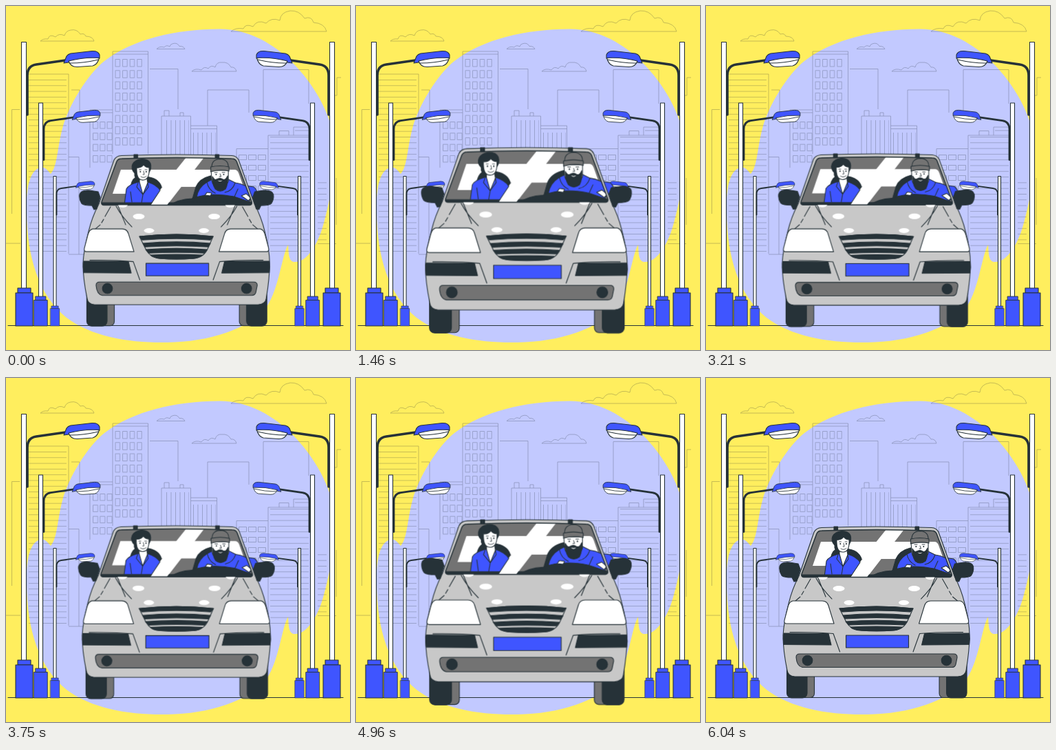
These frames come from a looping animation (500 by 500 pixels, 6080 ms). An HTML page:

```html
<!DOCTYPE html>
<html lang="en">
<head>
<meta charset="utf-8">
<title>Car ride</title>
<style>
  html, body { margin: 0; width: 100%; height: 100%; overflow: hidden; background: #ffee5e; }
  svg { display: block; width: 100vw; height: 100vh; }
  .city { fill: none; stroke: #263238; stroke-width: .7; opacity: .38; }
  .ink { stroke: #263238; stroke-width: 1.1; stroke-linejoin: round; stroke-linecap: round; }
  .ink * { vector-effect: non-scaling-stroke; }
  .dark { fill: #263238; }
  .blue { fill: #3f55ff; }
  .white { fill: #fff; }
  .grey { fill: #737373; }
  .body { fill: #c8c8c8; }
  .line { fill: none; }
  .bare { stroke: none; }
  .car { transform-origin: 247.5px 340.5px; animation: ride 6080ms linear infinite; }
  @keyframes ride {
    0% { transform: scale(1.001); }
    4.9% { transform: scale(1.022); }
    10.4% { transform: scale(1.054); }
    17.2% { transform: scale(1.1); }
    51.5% { transform: scale(1.0125); }
    57% { transform: scale(1.001); }
    61.5% { transform: scale(1.009); }
    69.9% { transform: scale(1.054); }
    77.4% { transform: scale(1.1); }
    99.4%, 100% { transform: scale(1); }
  }
</style>
</head>
<body>
<svg viewBox="0 0 500 500">
  <defs>
    <pattern id="tower" x="158.500" y="77" width="10.600" height="16.300" patternUnits="userSpaceOnUse">
      <path d="M.5 .5h6.500v10.500h-6.500z" fill="none" stroke="#263238" stroke-width=".7"/>
    </pattern>
    <pattern id="block" x="126" y="168" width="10.300" height="16.300" patternUnits="userSpaceOnUse">
      <path d="M.5 .5h7v9.500h-7z" fill="none" stroke="#263238" stroke-width=".7"/>
    </pattern>
    <pattern id="flat" x="338" y="216" width="14" height="15" patternUnits="userSpaceOnUse">
      <path d="M.5 .5h11v7h-11z" fill="none" stroke="#263238" stroke-width=".7"/>
    </pattern>
    <pattern id="floors" y="107" width="20" height="8.300" patternUnits="userSpaceOnUse">
      <path d="M0 .5h20" stroke="#263238" stroke-width=".7"/>
    </pattern>
    <pattern id="ribs" x="233" width="6.500" height="20" patternUnits="userSpaceOnUse">
      <path d="M.5 0v20" stroke="#263238" stroke-width=".7"/>
    </pattern>

    <!-- Arm and head; origin at the arm's x and the head's top -->
    <g id="arm">
      <path d="M0 93V36Q0 22 13 20L55 14" fill="none" style="vector-effect:none" stroke-width="3.600"/>
      <path class="blue" d="M53 18L57 8Q59 5 63 4L94 .5Q103 0 105 6V11L60 17Z"/>
      <path class="white" d="M60 15Q82 9 104.500 10.500Q102 20 95 22L73 23.500Q63 24 60 15Z"/>
      <path class="line" d="M62 18Q83 18 103 13"/>
    </g>
    <!-- Foot; origin at the arm's x and the ground -->
    <g id="foot" class="blue">
      <path d="M-14-55H5V-48H-14Z"/>
      <path d="M-17-48H8V0H-17Z"/>
    </g>
    <g id="lamps1">
      <path class="white" d="M22.500 52.500h7V411h-7z"/>
      <use href="#arm" transform="translate(31 65)"/>
      <use href="#foot" transform="translate(31 465)"/>
    </g>
    <g id="lamps2">
      <path class="white" d="M47.500 141h6V424h-6z"/>
      <use href="#arm" transform="translate(55 151) scale(.78)"/>
      <use href="#foot" transform="translate(54 465) scale(.78)"/>
    </g>
    <g id="lamps3">
      <path class="white" d="M69 247.500h4V438h-4z"/>
      <use href="#arm" transform="translate(73.500 254.500) scale(.527)"/>
      <use href="#foot" transform="translate(73.500 465) scale(.527)"/>
    </g>

    <g id="wheel">
      <rect class="grey" x="119" y="390" width="38.500" height="74.500" rx="6"/>
      <rect class="dark" x="117.500" y="390" width="29.500" height="75" rx="7"/>
    </g>
    <!-- Left half of the car front -->
    <g id="side">
      <path class="dark" d="M134 270L121 268Q109 267 107 274Q106 281 110 287Q113 290 125 290L128 296L132 295L137 278Z"/>
      <path class="line" d="M152 292L144 306M142 310L139 315M137 318L130 324M160 291Q168 306 183 321M163 291L174 318"/>
      <path class="white bare" d="M163 289.500H177Q175 293 170 293Q164 293 163 289.500Z"/>
      <ellipse class="white bare" cx="193" cy="306" rx="8.500" ry="4"/>
      <ellipse class="white bare" cx="208" cy="326.500" rx="7.500" ry="3.500"/>
      <path class="white" d="M126 324Q121 325 119 333L114 352Q113 357 117 357H186L178 331Q176 324 169 324Z"/>
      <path class="dark" d="M113 371L178 371.500L182 388L113 387.500Q111.500 379 113 371Z"/>
      <path class="line" d="M122 369.500Q160 369 185 371.500L194.500 398"/>
      <path class="dark" d="M186 216h5.500v5.500h-5.500z"/>
    </g>
    <clipPath id="glass"><path d="M168 222Q248 219 328 222Q333 222 335 226L357 285Q358 289 354 289.500H142Q138 289 139 285L161 226Q163 222 168 222Z"/></clipPath>
  </defs>

  <path fill="#ffee5e" d="M0 0H500V500H0Z"/>
  <path fill="#c2c9ff" d="M310 33.500C245 34 185 48 143 80C119 99 91 144 82 178C74 208 75 232 65 244C60 239 57 233 49 235C33 240 29 270 30 300C31 365 47 420 88 453C125 481 180 490 235 489C295 488 353 470 379 437C397 410 401 362 410 347C411 357 410 370 418 372C437 374 454 346 462 315C472 279 479 236 477 200C474 158 447 113 417 83C390 55 351 33 310 33.500Z"/>

  <g class="city">
    <path d="M33 99H91V360M20 150.500H8.500V302M0 345H21M95 122H107V155M91 219.500H106V361H114
             M155 215V66H206.500V215M155 70H206.500M122 235V151H155M122 155H155
             M209 91.500H250V150M226 216V160H268.500V216M230 160V152H237V160M253 160V155H258V160
             M268.500 174H306.500V216M268.500 178.500H306.500M293 174V122H353V155M374 160V92.500H440V142
             M335 222V207.500H381M381 360V188H443M397 188V181.500H411V188M418 188V176H441M420 181H441
             M487 104H481V130H477M453 345.500H480M480 250V318M91 361H106"/>
    <path stroke="none" fill="url(#floors)" d="M33 104H88V360H33ZM384 190H440V362H384ZM453 250H466V345H453Z"/>
    <path stroke="none" fill="url(#tower)" d="M158 76.500H201V207H158Z"/>
    <path stroke="none" fill="url(#block)" d="M125.500 167H156V232H125.500Z"/>
    <path stroke="none" fill="url(#flat)" d="M337 215H380V270H337Z"/>
    <path stroke="none" fill="url(#ribs)" d="M232 166H266V216H232ZM271 184H305V216H271Z"/>
    <g id="clouds">
      <path d="M50 51H128Q126 44 116 44Q114 39 108 41Q103 33 94 35Q87 36 85 43Q77 39 72 45Q63 40 61 48Q54 47 50 51Z"/>
      <path d="M219 62.500H260Q258 58 252 58.500Q249 53 243 54.500Q239 55 238 59Q233 56 230 60Q223 58 219 62.500Z"/>
      <path d="M270 95H335Q333 88 327 89Q323 81 314 82Q306 81 304 89Q298 85 294 91Q288 87 284 93Q275 90 270 95Z"/>
      <path d="M327 37H466Q463 25 447 24Q444 14 434 18Q426 6 413 7Q399 9 398 21Q386 16 378 25Q365 19 359 30Q348 25 345 33Q334 31 327 37Z"/>
    </g>
  </g>

  <path class="ink" d="M3 464.500H490"/>

  <g class="ink">
    <use href="#lamps1"/>
    <use href="#lamps2"/>
    <use href="#lamps3"/>
    <use href="#lamps1" transform="translate(500) scale(-1 1)"/>
    <use href="#lamps2" transform="translate(496) scale(-1 1)"/>
    <use href="#lamps3" transform="translate(497.500) scale(-1 1)"/>
  </g>

  <g class="car ink">
    <use href="#wheel"/>
    <use href="#wheel" transform="translate(496.500) scale(-1 1)"/>
    <path class="blue" d="M346 261L360 263Q366 268 364 274L354 283Z"/>
    <path class="body" d="M168 217.500Q248 214.500 328 217.500Q335 218 338 224L361 288Q371 307 376 328Q383 355 383 374Q383 395 378 425Q377 433 366 434H129Q119 433 118 425Q112 396 112 374Q113 355 120 328Q125 307 135 288L157 224Q160 218 168 217.500Z"/>

    <g clip-path="url(#glass)">
      <path class="grey bare" d="M130 215H370V295H130Z"/>
      <path class="white bare" d="M167 238H332Q336 238 338 243L349 274H280V263H225L215 273H155Z"/>
      <path class="dark" d="M203 248Q222 250 226 263L216 284H178L181 262Q184 249 192 248Z"/>
      <path class="dark" d="M297 247Q281 251 276 263L271 280H305V247Z"/>
      <path class="white bare" d="M262 220H288L233 291H205Z"/>

      <!-- Passenger -->
      <path class="dark" d="M197 222.500Q207 222 210 229Q212 236 208 242L194 252Q186 251 187 243Q181 237 184 230Q188 223 197 222.500Z"/>
      <path class="blue" d="M172 289L175 266Q178 260 192 256H206Q219 260 224 268L210 289Z"/>
      <path class="white" d="M194 246V256L199 274L206 257L204 246Z"/>
      <path class="line" d="M192 257L190 263L199 274L207 263L206 257M181 270L183 285M199 274L197 286"/>
      <path class="white" d="M190 235Q189 254 200 253Q209 252 208 235Q203 235 200 231Q196 236 190 235Z"/>
      <path class="line" stroke-width=".8" d="M193.500 238h3M202 238h3M200 240L201 245H199M196 248Q200 251 204 247.500"/>
      <path class="dark bare" d="M194.500 240h1.600v2h-1.600zM203 240h1.600v2h-1.600z"/>

      <!-- Driver -->
      <path class="blue" d="M277 278Q279 264 292 256L302 251H321L333 257Q349 259 358 270L353 285H280Z"/>
      <path class="line" d="M292 256Q294 267 304 272M333 257Q329 269 318 271M337 266L332 277"/>
      <path class="white" d="M298 239H323V255Q320 263 310 263Q300 262 299 254Z"/>
      <path class="dark" d="M300 248Q303 254 306 252Q311 249 315 252Q319 254 322 247Q323 258 319 266Q311 272 304 266Q299 258 300 248Z"/>
      <path class="white bare" d="M307.500 253.500Q311 255 314.500 253.500Q311 257 307.500 253.500Z"/>
      <path class="line" stroke-width=".9" d="M303 242h4M314 242h4M311 244L312.500 248H310"/>
      <path class="dark bare" d="M304.500 244h1.600v2h-1.600zM315.500 244h1.600v2h-1.600z"/>
      <path class="grey" d="M299 236Q298 223 311 222.500Q324 223 323 236Z"/>
      <path class="grey" d="M297.500 234Q311 231 324 234V240Q311 237 297.500 241Z"/>
      <path class="dark" d="M236 291Q249 281 270 280Q296 270 331 277L361 287V292Z"/>
      <path class="white" d="M289 275L292 271L299 272L297 276ZM342 276L349 273L356 279L352 283Z"/>
      <path class="dark bare" d="M135 285.500H213L208 292H135ZM237 285.500L361 286V292H232Z"/>
    </g>
    <path class="line" stroke-width="1.500" d="M168 222Q248 219 328 222Q333 222 335 226L357 285Q358 289 354 289.500H142Q138 289 139 285L161 226Q163 222 168 222Z"/>

    <use href="#side"/>
    <use href="#side" transform="translate(495.500) scale(-1 1)"/>

    <path class="body" d="M194 335Q248 329 301 335L292 355Q285 367 270 367Q248 369 226 367Q210 366 204 355Z"/>
    <path class="dark" d="M194 335Q248 329 301 335L297 340Q248 336 198 340Z"/>
    <path class="dark" d="M199 345Q248 340.500 297 345L294 350Q248 347 202 350Z"/>
    <path class="dark" d="M203 354Q248 350.500 292 354L288 359Q248 357 208 359Z"/>
    <path class="dark" d="M210 362Q248 360 285 362Q281 366 272 367Q248 368 224 367Q214 366 210 362Z"/>
    <path class="blue" d="M203.500 374h91v18h-91z"/>
    <path class="grey" d="M136 401H360Q365 401 365 406L363 416Q362 420.500 357 420.500H140Q132 419 131 406Q131 401 136 401Z"/>
    <circle class="dark" cx="147.500" cy="410.500" r="7.300"/>
    <circle class="dark" cx="349.500" cy="410.500" r="7.300"/>
  </g>
</svg>
</body>
</html>
```
